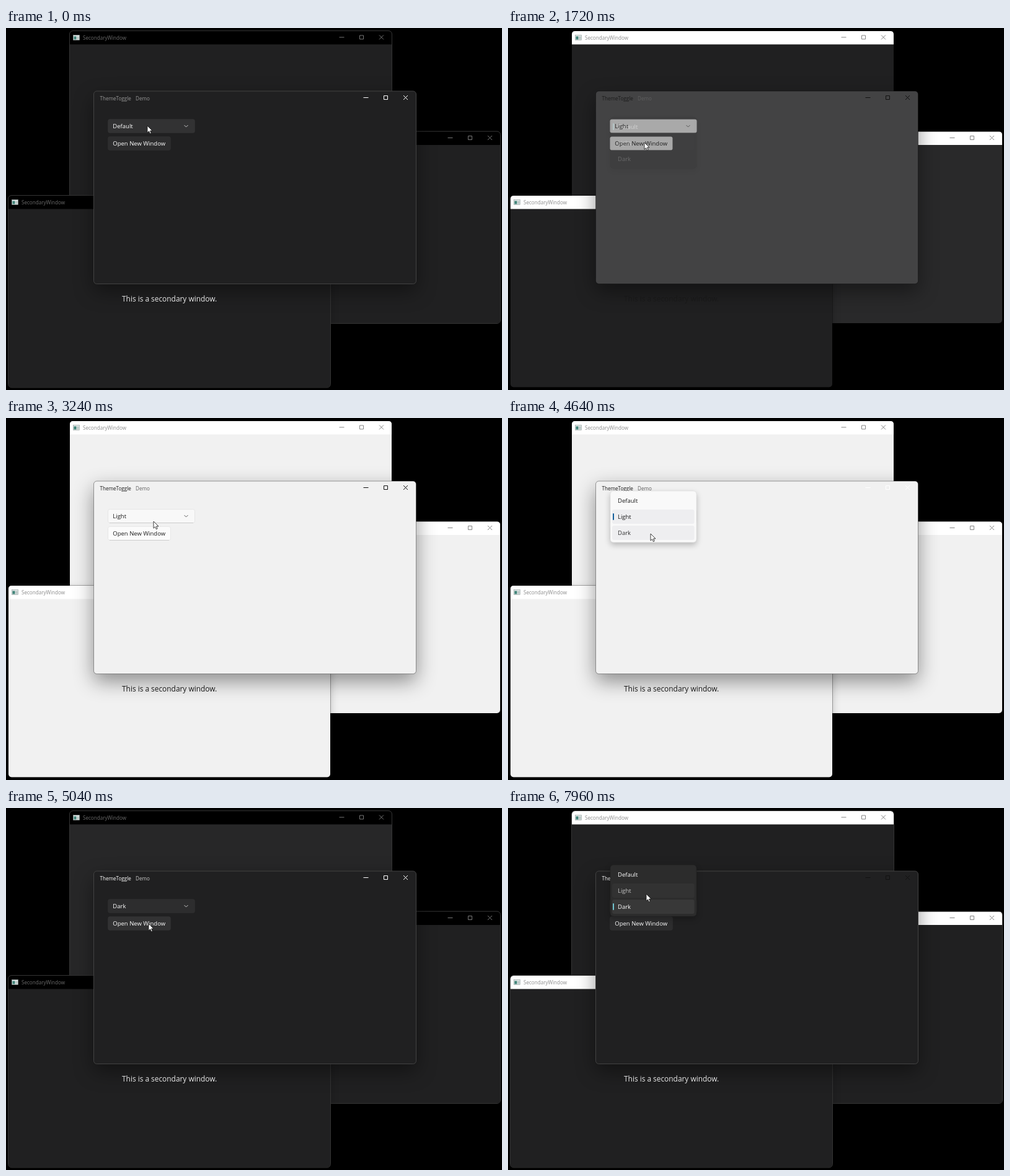
An HTML page for the animation above (8000 ms loop, 800 px wide and 585 px high).

```html
<!DOCTYPE html>
<html lang="en">
<head>
<meta charset="utf-8">
<title>Theme toggle</title>
<style>
  html, body { margin: 0; width: 100%; height: 100%; overflow: hidden; background: #000; }
  svg { display: block; width: 800px; height: 585px; }
  text { font-family: "Open Sans", "Noto Sans", sans-serif; font-size: 9.5px; white-space: pre; }
  .title { font-size: 8.1px; }
  .body { font-size: 11.9px; }
  .line { fill: none; stroke-width: 1; }
  .soft { filter: drop-shadow(0 5px 7px rgba(0, 0, 0, .22)); }
  .deep { filter: drop-shadow(0 12px 16px rgba(0, 0, 0, .42)); }
  .flyout { filter: drop-shadow(0 4px 5px rgba(0, 0, 0, .24)); }
</style>
</head>
<body>
<svg id="stage" viewBox="0 0 800 585"></svg>
<script>
const LOOP = 8000, TICK = 40, FADE = 240;
const NAMES = ['Default', 'Light', 'Dark'];
const BARS = [[0, 0], [1240, 1], [4720, 0], [7960, 1]];
const CAPTION = [[0, 0], [1240, 1], [4640, 0], [7960, 1]];
const THEME = [[0, 0], [1680, 1], [4720, 0]];
const LABEL = [[0, 0], [1680, 1], [4720, 2]];
const PRESS = [[0, 0], [160, 1], [1680, 0], [3480, 1], [4720, 0], [6640, 1]];
const MENUS = [
  { open: 400, press: 1200, close: 1680, sel: 0, pick: 1, light: 0 },
  { open: 3720, press: 4600, close: 4720, sel: 1, pick: 2, light: 1 },
  { open: 6920, press: 7920, close: 9999, sel: 2, pick: 1, light: 0 }
];
// time, x, y
const PATH = [
  [0, 228, 158], [680, 228, 158], [1140, 220, 185], [2600, 220, 185],
  [3160, 238, 167], [3960, 238, 167], [4360, 230, 187], [5880, 230, 187],
  [5920, 229, 185], [6320, 229, 185], [6480, 226, 165], [7160, 226, 165],
  [7480, 223, 139]
];

const stage = document.getElementById('stage');
const clamp = v => Math.max(0, Math.min(1, v));
const mix = (a, b, p) => a + (b - a) * p;
const at = (steps, t) => steps.filter(s => s[0] <= t).pop()[1];
const set = (node, attrs) => {
  for (const k in attrs) node.setAttribute(k, attrs[k]);
  return node;
};
const add = (parent, tag, attrs = {}) =>
  parent.appendChild(set(document.createElementNS('http://www.w3.org/2000/svg', tag), attrs));
const label = (parent, x, y, str, cls = '') => {
  const node = add(parent, 'text', { x, y, class: cls });
  node.textContent = str;
  return node;
};
const box = (parent, x, y, width, height, rx, more = {}) =>
  add(parent, 'rect', { x, y, width, height, rx, ...more });

function captions(parent, x, y) {
  return add(parent, 'path', {
    class: 'line',
    transform: `translate(${x} ${y})`,
    d: 'M434.5 10.5h8M467.5 7.5h6v6h-6zM499 7l7 7m0-7l-7 7'
  });
}

function appIcon(parent, x, y) {
  box(parent, x, y, 10, 8, 0, { fill: '#e4eaea', stroke: '#8d9896', 'stroke-width': .6 });
  box(parent, x + 1, y + 2, 4, 5, 0, { fill: '#3e8277' });
  box(parent, x + 6, y + 2, 3, 5, 0, { fill: '#b9c6c4' });
}

function secondary(x, y, delay) {
  const g = add(stage, 'g');
  const back = box(g, x, y, 519, 309.5, 5, { class: 'soft' });
  const bar = add(g, 'path', { d: `M${x} ${y + 21.5}v-16.5q0-5 5-5h509q5 0 5 5v16.5z` });
  appIcon(g, x + 5.5, y + 6.5);
  const name = label(g, x + 21, y + 13.7, 'SecondaryWindow', 'title');
  const text = label(g, x + 183, y + 170.5, 'This is a secondary window.', 'body');
  const buttons = captions(g, x, y - .5);
  const edge = box(g, x - .5, y - .5, 520, 310.5, 5.5, { class: 'line' });
  return { back, bar, name, text, buttons, edge, delay };
}

const windows = [
  secondary(103, 5, 88), secondary(278, 167.5, 30), secondary(4, 271, 58)
];

const main = add(stage, 'g');
const mainBack = box(main, 141.5, 102, 520, 311.5, 5, { class: 'deep' });
const mainEdge = box(main, 141.5, 102, 520, 311.5, 5, { class: 'line' });
const mainName = label(main, 151.5, 117, 'ThemeToggle', 'title');
const mainSub = label(main, 209, 117, 'Demo', 'title');
const mainButtons = captions(main, 142, 102);

function control(y, width, str) {
  const face = box(main, 164.5, y, width, 22, 3);
  const rim = add(main, 'path', { class: 'line', d: `M167 ${y + 22}h${width - 5}` });
  return { face, rim, y, width, text: label(main, 172.3, y + 14.5, str) };
}
const combo = control(147.5, 140, 'Default');
const chevron = add(main, 'path', { class: 'line', d: 'M287.5 157l3 3 3-3' });
const button = control(175.5, 101, 'Open New Window');

const menu = add(stage, 'g');
const panel = box(menu, 165, 0, 139, 83, 5, { class: 'flyout' });
const clip = box(add(stage, 'clipPath', { id: 'cut' }), 165, 0, 139, 83, 5);
const list = add(menu, 'g', { 'clip-path': 'url(#cut)' });
const rows = NAMES.map(str => ({
  face: box(list, 168, 0, 132.5, 23, 3),
  text: label(list, 177, 0, str)
}));
const mark = box(list, 169, 154, 2, 11, 1);

const cursor = add(stage, 'path', {
  d: 'M0 0V11.2L2.6 8.8 4.3 12.7 6.2 11.9 4.5 8H8Z',
  fill: '#fff', stroke: '#111', 'stroke-width': .8, 'stroke-linejoin': 'round'
});

function pointer(t) {
  const i = PATH.findIndex(p => p[0] > t);
  if (i < 0) return PATH[PATH.length - 1].slice(1);
  const [t0, x0, y0] = PATH[i - 1], [t1, x1, y1] = PATH[i];
  const p = (t - t0) / (t1 - t0), e = p * p * (3 - 2 * p);
  return [mix(x0, x1, e), mix(y0, y1, e)];
}

// Page colour, fading after each theme switch
function surface(t, delay) {
  const light = at(THEME, t);
  const start = THEME.filter(s => s[0] <= t).pop()[0];
  const p = start ? clamp((t - start - delay) / FADE) : 1;
  const level = light ? p : 1 - p;
  const v = Math.round(mix(32, 241, level));
  return `rgb(${v},${v},${v + (level < .5 ? 1 : 0)})`;
}

function paintControl(c, light, [x, y], free) {
  const hover = free && x > 164 && x < 164 + c.width && y > c.y && y < c.y + 22;
  const alpha = light ? (hover ? .5 : .7) : (hover ? .084 : .06);
  set(c.face, {
    fill: `rgba(255,255,255,${alpha})`,
    stroke: light ? 'rgba(0,0,0,.06)' : 'rgba(255,255,255,.025)'
  });
  set(c.rim, { stroke: light ? 'rgba(0,0,0,.12)' : 'none' });
  set(c.text, { fill: light ? '#1b1b1b' : '#fff' });
}

function paintMenu(t, [x, y]) {
  const m = MENUS.find(o => t >= o.open && t < o.close + 80);
  menu.style.display = m ? '' : 'none';
  if (!m) return false;
  const p = 1 - (1 - clamp((t - m.open + TICK) / 250)) ** 4;
  const top = 144 - 26 * m.sel;
  const y0 = mix(147, top, p), height = mix(170, top + 83, p) - y0;
  menu.style.opacity = 1 - clamp((t - m.close + TICK) / 100);
  set(panel, {
    y: y0, height, 'stroke-width': .6,
    fill: m.light ? '#f9f9f9' : '#2c2c2c', stroke: m.light ? '#dcdcdc' : '#232323'
  });
  set(clip, { y: y0, height });
  rows.forEach((row, i) => {
    const ry = top + 4 + 26 * i;
    const hot = y >= ry - 1 && y < ry + 25;
    const pressed = t >= m.press && i === m.pick;
    const dark = i === m.sel ? '#383838' : hot ? '#323232' : 'none';
    const pale = i === m.sel || hot ? '#eeeef0' : 'none';
    set(row.face, { y: ry, fill: m.light ? pale : dark });
    set(row.text, {
      y: ry + 14.8,
      fill: m.light ? (pressed ? '#303030' : '#1b1b1b') : (pressed ? '#c5c5c5' : '#fff')
    });
  });
  set(mark, { fill: m.light ? '#14609c' : '#70c4d0' });
  return true;
}

function render(t) {
  const light = at(THEME, t), bars = at(BARS, t), active = t >= 160;
  const pos = pointer(t);

  for (const w of windows) {
    set(w.back, { fill: surface(t, w.delay) });
    set(w.bar, { fill: bars ? '#fff' : '#000' });
    set(w.name, { fill: bars ? '#8c8c8c' : '#6b6b6b' });
    set(w.buttons, { stroke: bars ? '#858585' : '#777' });
    set(w.text, { fill: light ? '#1b1b1b' : '#fff' });
    set(w.edge, { stroke: light ? 'rgba(0,0,0,.3)' : '#343434' });
  }

  set(mainBack, { fill: surface(t, 0) });
  set(mainEdge, { stroke: light ? 'rgba(0,0,0,.36)' : '#434343' });
  set(mainName, { fill: light ? '#1b1b1b' : active ? '#fff' : '#979797' });
  set(mainSub, { fill: light ? '#606060' : active ? '#c8c8c8' : '#979797' });
  set(mainButtons, { stroke: at(CAPTION, t) ? '#111' : '#fff' });

  const open = paintMenu(t, pos);
  paintControl(combo, light, pos, !open);
  paintControl(button, light, pos, !open);
  combo.text.textContent = NAMES[at(LABEL, t)];
  const pressed = at(PRESS, t);
  if (pressed) set(combo.text, { fill: light ? '#606060' : '#c5c5c5' });
  set(chevron, { stroke: light ? '#606060' : pressed ? '#999' : '#c8c8c8' });
  set(cursor, { transform: `translate(${pos[0]} ${pos[1]})` });
}

const begin = performance.now();
function frame() {
  const t = (performance.now() - begin) % LOOP;
  render(Math.floor(t / TICK) * TICK);
  requestAnimationFrame(frame);
}
frame();
</script>
</body>
</html>
```
